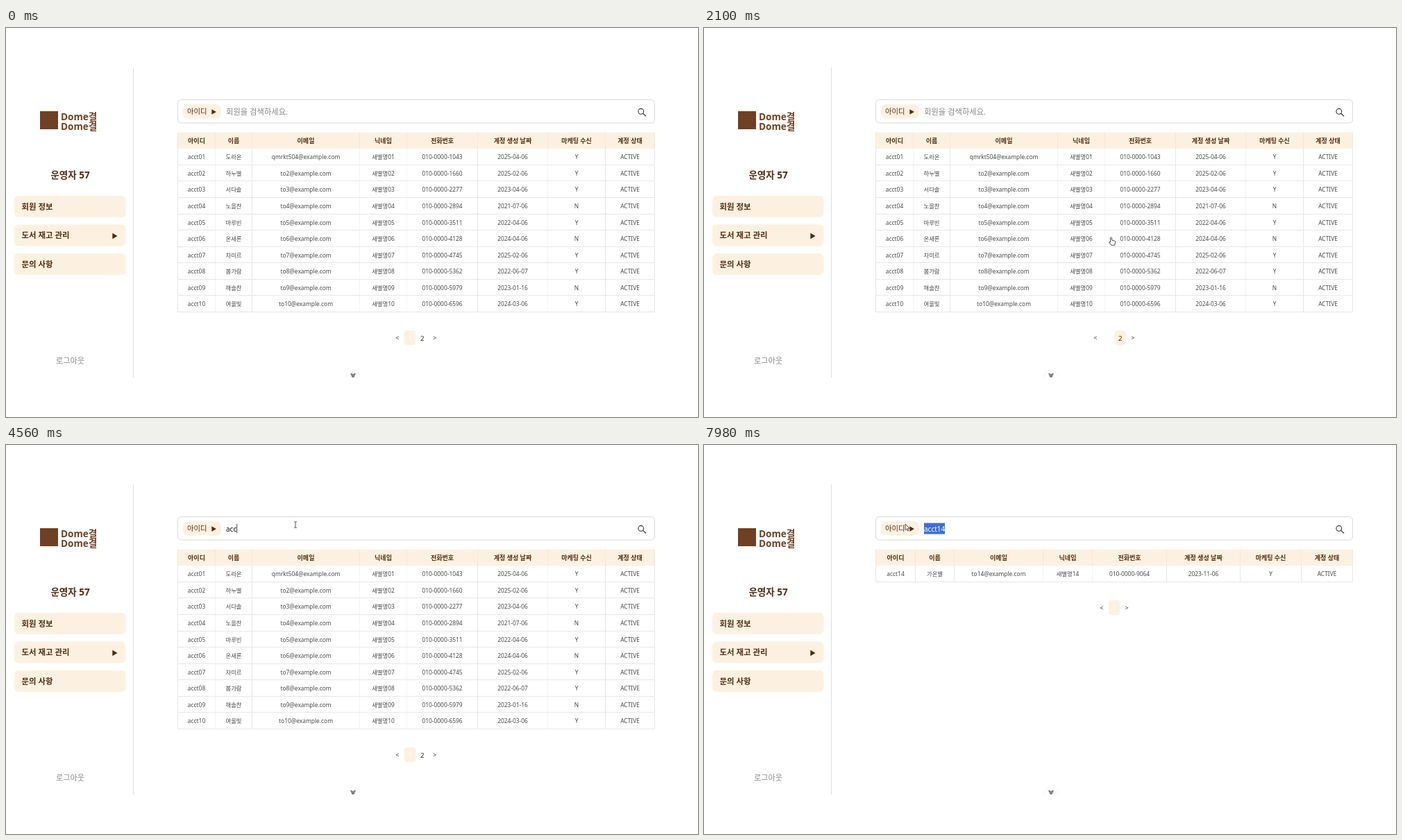
An HTML page with a canvas that plays this animation: 997 by 561 pixels, repeating every 8000 ms.

```html
<!DOCTYPE html>
<html lang="ko">
<head>
<meta charset="utf-8">
<title>회원 정보</title>
<style>
html, body { margin: 0; width: 100%; height: 100%; overflow: hidden; background: #fff; }
canvas { display: block; }
</style>
</head>
<body>
<canvas id="stage" width="997" height="561"></canvas>
<script>
const ctx = document.getElementById('stage').getContext('2d');
const LOOP = 8000;
const FONT = '"Noto Sans", "Noto Sans CJK KR", "Noto Sans CJK", sans-serif';
const CREAM = '#fcf1e0', BROWN = '#552a10', LOGO = '#6f4023', LINE = '#e6e6e6', FAINT = '#f3f3f3';

// Timeline in ms
const NEXT = 1370, BACK = 2090, FOCUS = 3700, ENTER = 6480;
const KEYS = [4150, 4320, 4470, 4620, 4830, 4980];
const QUERY = 'acct14';

const HEADS = ['아이디', '이름', '이메일', '닉네임', '전화번호', '계정 생성 날짜', '마케팅 수신', '계정 상태'];
const COLS_A = [247.5, 301.5, 354.5, 509.5, 577.5, 679.5, 780.5, 863.5, 934.5];
const COLS_B = [247.5, 304.5, 360.5, 488.5, 559.5, 666.5, 772.5, 860.5, 934.5];
const FAINT_A = [1, 3, 4, 6], FAINT_B = [3, 4];

const NAMES = ['도라온', '하누별', '서다솔', '노을찬', '마루빈', '온새론', '차미르', '봄가람',
  '해솔찬', '여울빛', '늘봄찬', '새론빛', '단미솔', '가온별'];
const DATES = ['2025-04-06', '2025-02-06', '2023-04-06', '2021-07-06', '2022-04-06', '2024-04-06', '2025-02-06',
  '2022-06-07', '2023-01-16', '2024-03-06', '2022-05-06', '2024-08-06', '2021-09-06', '2023-11-06'];
const CONSENT = 'YYYNYNYYNYYNYY';

const MEMBERS = NAMES.map((name, i) => {
  const n = i + 1, id = String(n).padStart(2, '0');
  const mail = i ? `to${n}@example.com` : 'qmrkt504@example.com';
  return ['acct' + id, name, mail, '새별명' + id, '010-0000-' + (1043 + i * 617), DATES[i], CONSENT[i], 'ACTIVE'];
});

const clamp = v => Math.max(0, Math.min(1, v));
const ease = v => v * v * (3 - 2 * v);

function text(str, x, y, size, color, weight = 400, align = 'center') {
  ctx.font = `${weight} ${size}px ${FONT}`;
  ctx.textAlign = align;
  ctx.fillStyle = color;
  ctx.fillText(str, x, y + size * 0.37);
}

function box(x, y, w, h, r, fill, stroke) {
  ctx.beginPath();
  ctx.roundRect(x, y, w, h, r);
  if (fill) { ctx.fillStyle = fill; ctx.fill(); }
  if (stroke) { ctx.strokeStyle = stroke; ctx.lineWidth = 1; ctx.stroke(); }
}

function line(x1, y1, x2, y2, color, width = 1) {
  ctx.beginPath();
  ctx.moveTo(x1, y1);
  ctx.lineTo(x2, y2);
  ctx.strokeStyle = color;
  ctx.lineWidth = width;
  ctx.stroke();
}

function poly(points, fill, stroke) {
  ctx.beginPath();
  points.forEach(([x, y]) => ctx.lineTo(x, y));
  ctx.closePath();
  ctx.fillStyle = fill;
  ctx.fill();
  if (stroke) { ctx.strokeStyle = stroke; ctx.lineWidth = 0.8; ctx.stroke(); }
}

const play = (x, y, w, h) => poly([[x, y - h / 2], [x + w, y], [x, y + h / 2]], BROWN);

function sidebar() {
  line(183.5, 57, 183.5, 504, '#dddddd');
  ctx.fillStyle = LOGO;
  ctx.fillRect(49, 120, 26, 26);
  text('Dome결', 79, 127.5, 13.6, LOGO, 700, 'left');
  text('Dome결', 79, 142, 13.6, LOGO, 700, 'left');
  text('운영자 57', 92.5, 212, 13.5, BROWN, 700);
  ['회원 정보', '도서 재고 관리', '문의 사항'].forEach((label, i) => {
    const y = 242 + i * 41.5;
    box(12, y, 160.5, 31, 6, CREAM);
    text(label, 22.6, y + 15.5, 11.4, BROWN, 700, 'left');
  });
  play(153.3, 300, 7.2, 8.6);
  text('로그아웃', 92.5, 479.5, 11.1, '#858585');
}

function searchBar(t) {
  box(247.5, 103.5, 687, 33.5, 5, '#fff', '#d9d9d9');
  box(255, 110, 55, 20.5, 7, CREAM);
  text('아이디', 275.3, 120, 10.3, BROWN);
  play(296.4, 121, 6.5, 7.6);

  ctx.beginPath();
  ctx.arc(914.8, 120.3, 3.9, 0, 7);
  ctx.strokeStyle = '#333';
  ctx.lineWidth = 1.1;
  ctx.stroke();
  line(917.6, 123.1, 922, 127.3, '#333', 1.3);

  const typed = QUERY.slice(0, KEYS.filter(k => t >= k).length);
  if (typed) text(typed, 317, 121, 10, '#111', 400, 'left');
  else text('회원을 검색하세요.', 317, 120.5, 11.3, '#858585', 400, 'left');

  ctx.font = `400 10px ${FONT}`;
  const end = 317 + ctx.measureText(typed).width;
  const from = t > 7150 ? Math.max(317, Math.min(end, cursorAt(t)[0])) : end;
  if (from < end) {
    ctx.save();
    ctx.beginPath();
    ctx.rect(from, 112.5, end - from, 16);
    ctx.clip();
    ctx.fillStyle = '#3b6fd4';
    ctx.fillRect(from, 112, end - from, 17);
    text(typed, 317, 121, 10, '#fff', 400, 'left');
    ctx.restore();
  } else if (t >= FOCUS) {
    const reset = Math.max(...[FOCUS, ...KEYS, ENTER].filter(k => k <= t));
    if ((t - reset) % 1000 < 500) line(end + 0.5, 114, end + 0.5, 127, '#333', 0.9);
  }
}

function table(rows, cols, faint) {
  const left = cols[0], right = cols[8], top = 150.5, head = 174.2, step = 23.58;
  const bottom = head + rows.length * step;
  const mid = i => (cols[i] + cols[i + 1]) / 2;
  ctx.fillStyle = CREAM;
  ctx.fillRect(left, top, right - left + 0.5, head - top);
  cols.forEach((x, i) => {
    line(x, top, x, head, '#f3e8d9');
    line(x, head, x, bottom, faint.includes(i) ? FAINT : LINE);
  });
  HEADS.forEach((h, i) => text(h, mid(i), 162.5, 9, BROWN, 700));
  rows.forEach((row, r) => {
    const y = head + r * step;
    row.forEach((cell, i) => text(cell, mid(i), y + 11.9, 8.4, '#484848'));
    const edge = Math.round(y + step) - 0.5;
    line(left, edge, right, edge, LINE);
  });
  return bottom;
}

function pager(y, count, active, blend) {
  const x0 = 591 - (count - 1) * 8.9;
  text('<', x0 - 18.3, y, 9, '#333');
  for (let p = 1; p <= count; p++) {
    const x = x0 + (p - 1) * 17.6;
    ctx.globalAlpha = p === active ? blend : 1 - blend;
    box(x - 8.3, y - 10.8, 16.6, 21, 4, CREAM);
    ctx.globalAlpha = 1;
    text(String(p), x, y, 9.8, p === active ? '#fff' : '#3a2618');
  }
  text('>', x0 + (count - 1) * 17.6 + 18, y, 9, '#333');
}

function scrollHint() {
  ctx.save();
  ctx.beginPath();
  ctx.rect(480, 490, 40, 14);
  ctx.clip();
  ctx.beginPath();
  ctx.arc(500, 503, 10, 0, 7);
  ctx.strokeStyle = '#f4f4f4';
  ctx.lineWidth = 1;
  ctx.stroke();
  poly([[496, 498], [498.3, 498], [500, 499.6], [501.7, 498], [504, 498], [501.4, 504], [498.6, 504]], '#808080');
  ctx.restore();
}

// [start, end, x, y]: glide to the point during the interval
const PATH = [
  [480, 1150, 598, 445],
  [1480, 1980, 586.5, 302],
  [2450, 3500, 417, 115],
  [7180, 7800, 290, 114]
];

function cursorAt(t) {
  let x = 612, y = 506;
  for (const [a, b, px, py] of PATH) {
    const k = ease(clamp((t - a) / (b - a)));
    x += (px - x) * k;
    y += (py - y) * k;
  }
  return [x, y];
}

function arrow() {
  poly([[0, 0], [0, 8.6], [2, 6.8], [3.4, 9.8], [4.8, 9.2], [3.5, 6.3], [6, 6.1]], '#fff', '#222');
}

function hand() {
  ctx.beginPath();
  ctx.moveTo(-1, 7);
  ctx.lineTo(-1, 0.6);
  ctx.quadraticCurveTo(0, -0.8, 1, 0.6);
  ctx.lineTo(1, 4);
  ctx.lineTo(5.2, 5);
  ctx.quadraticCurveTo(6.4, 5.3, 6.2, 7);
  ctx.lineTo(5, 11.3);
  ctx.lineTo(0.4, 11.3);
  ctx.lineTo(-3, 7.2);
  ctx.quadraticCurveTo(-2.6, 5.6, -1, 7);
  ctx.closePath();
  ctx.fillStyle = '#fff';
  ctx.fill();
  ctx.strokeStyle = '#333';
  ctx.lineWidth = 0.9;
  ctx.stroke();
}

function beam() {
  line(0, -4, 0, 4, '#444', 0.9);
  line(-2, -4.2, 2, -4.2, '#444', 0.8);
  line(-2, 4.2, 2, 4.2, '#444', 0.8);
}

function cursor(t) {
  if (t < 480) return;
  const [x, y] = cursorAt(t);
  const overNext = t < NEXT && y < 457;
  const overBack = t > NEXT && t < BACK + 120 && y < 315;
  const overInput = y < 137 && x > 312;
  ctx.save();
  ctx.beginPath();
  ctx.rect(0, 57, 997, 447);
  ctx.clip();
  ctx.translate(x, y);
  if (overNext || overBack) hand();
  else if (overInput) beam();
  else arrow();
  ctx.restore();
}

function draw(t) {
  ctx.fillStyle = '#fff';
  ctx.fillRect(0, 0, 997, 561);
  sidebar();
  searchBar(t);

  const found = t >= ENTER, second = t >= NEXT && t < BACK;
  const rows = found ? MEMBERS.slice(13) : second ? MEMBERS.slice(10) : MEMBERS.slice(0, 10);
  const short = found || second;
  const bottom = table(rows, short ? COLS_B : COLS_A, short ? FAINT_B : FAINT_A);

  const turned = t >= BACK ? BACK : t >= NEXT ? NEXT : -LOOP;
  const blend = found ? 1 : ease(clamp((t - turned - 30) / 180));
  pager(bottom + 37, found ? 1 : 2, second ? 2 : 1, blend);

  scrollHint();
  cursor(t);
}

const start = performance.now();
function tick() {
  draw((performance.now() - start) % LOOP);
  requestAnimationFrame(tick);
}
tick();
</script>
</body>
</html>
```
